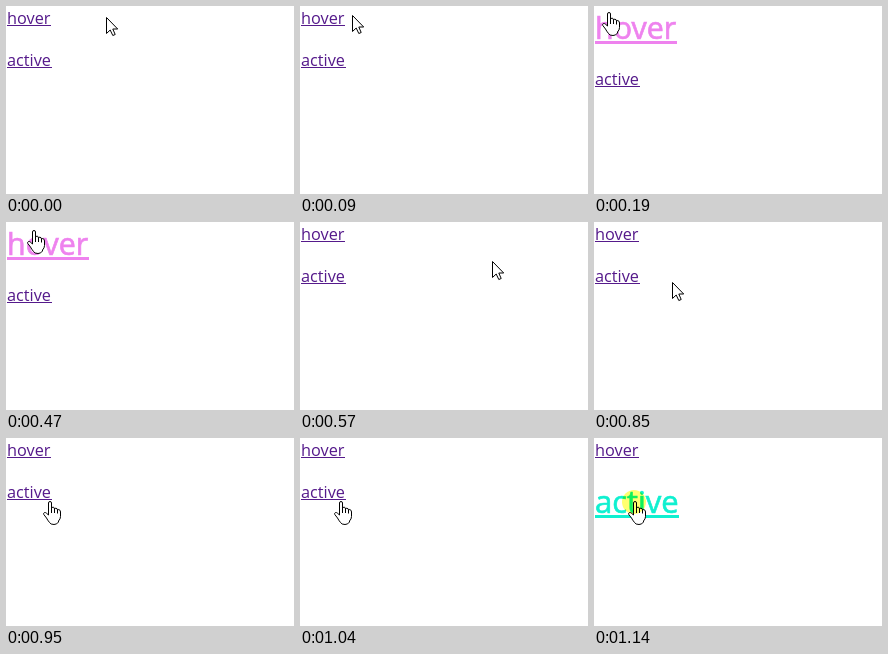
An HTML page that plays this animation: 288x188 px, repeating every 1.76 s.

```html
<!DOCTYPE html>
<html lang="en">
<head>
<meta charset="utf-8">
<title>Link states</title>
<style>
  html, body { margin: 0; width: 100%; height: 100%; overflow: hidden; background: #fff; }
  svg { display: block; width: 100%; height: 100%; }
  text { font-family: "Open Sans", "Noto Sans", sans-serif; }
  .cursor path { fill: #fff; stroke: #000; stroke-width: 1; stroke-linejoin: round; }
  #click { fill: #ffff70; mix-blend-mode: multiply; }
</style>
</head>
<body>
<svg viewBox="0 0 288 188">
  <rect width="288" height="188" fill="#fff"/>
  <g id="hover"><text>hover</text><rect/></g>
  <g id="active"><text>active</text><rect/></g>
  <g id="arrow" class="cursor">
    <path d="M.5 .5V16.5L4.2 13L6.8 18.5L9.2 17.5L6.8 12H11.7Z"/>
  </g>
  <g id="hand" class="cursor">
    <path d="M5.5 14V2Q5.5 .5 7 .5T8.5 2V7.5Q8.8 6 10.2 6.2Q11.5 6.4 11.5 8Q12 7 13 7.2Q14.5 7.5 14.5 9Q15 8.3 16 8.7Q17.5 9 17.5 11V15.5Q17.5 18 15.5 20V21Q14 23.5 11 23.5Q7.5 23.5 6.5 21.5Q4.5 19 3.5 17L.8 13.5Q.2 12 1.5 11.5Q2.6 11.3 3.6 12.3Z"/>
    <path d="M8.5 7V12M11.5 8V12M14.5 9V12.5" fill="none"/>
  </g>
  <circle id="click" cx="40" cy="64" r="12"/>
</svg>
<script>
  const LOOP = 1760;
  const VISITED = "#551a8b";
  const $ = id => document.getElementById(id);

  // start time, pointer shape, pointer x, y, link state
  const steps = [
    [0, "arrow", 100, 11, ""],
    [90, "arrow", 52, 9, ""],
    [190, "hand", 8, 6, "hover"],
    [470, "hand", 21, 8, "hover"],
    [570, "arrow", 192, 39, ""],
    [660, "arrow", 215, 46, ""],
    [750, "arrow", 135, 53, ""],
    [850, "arrow", 78, 60, ""],
    [950, "hand", 37, 63, ""],
    [1040, "hand", 34, 63, ""],
    [1140, "hand", 34, 63, "active"]
  ];

  const links = {
    hover: { y: 18, small: 44, large: 82, size: 30.4, color: "#ee82ee" },
    active: { y: 60, small: 45, large: 84, size: 31, color: "#0ff0d0" }
  };

  function setAttrs(el, attrs) {
    for (const key in attrs) el.setAttribute(key, attrs[key]);
  }

  function drawLink(id, big, shift) {
    const link = links[id];
    const [text, line] = $(id).children;
    const color = big ? link.color : VISITED;
    const y = link.y + shift + (big ? 15 : 0);
    setAttrs(text, {
      x: 1,
      y,
      fill: color,
      stroke: big ? color : "none",
      "stroke-width": 0.7,
      "font-size": big ? link.size : 16.3
    });
    setAttrs(line, {
      x: 1,
      y: y + (big ? 2 : 1),
      width: big ? link.large : link.small,
      height: big ? 3 : 1,
      fill: color
    });
  }

  function draw(time) {
    const [, shape, x, y, state] = steps.findLast(step => step[0] <= time);
    drawLink("hover", state === "hover", 0);
    drawLink("active", state === "active", state === "hover" ? 19 : 0);
    for (const id of ["arrow", "hand"]) {
      setAttrs($(id), {
        transform: `translate(${x} ${y})`,
        visibility: id === shape ? "visible" : "hidden"
      });
    }
    $("click").setAttribute("visibility", state === "active" ? "visible" : "hidden");
  }

  const start = performance.now();
  function tick() {
    draw((performance.now() - start) % LOOP);
    requestAnimationFrame(tick);
  }
  tick();
</script>
</body>
</html>
```
